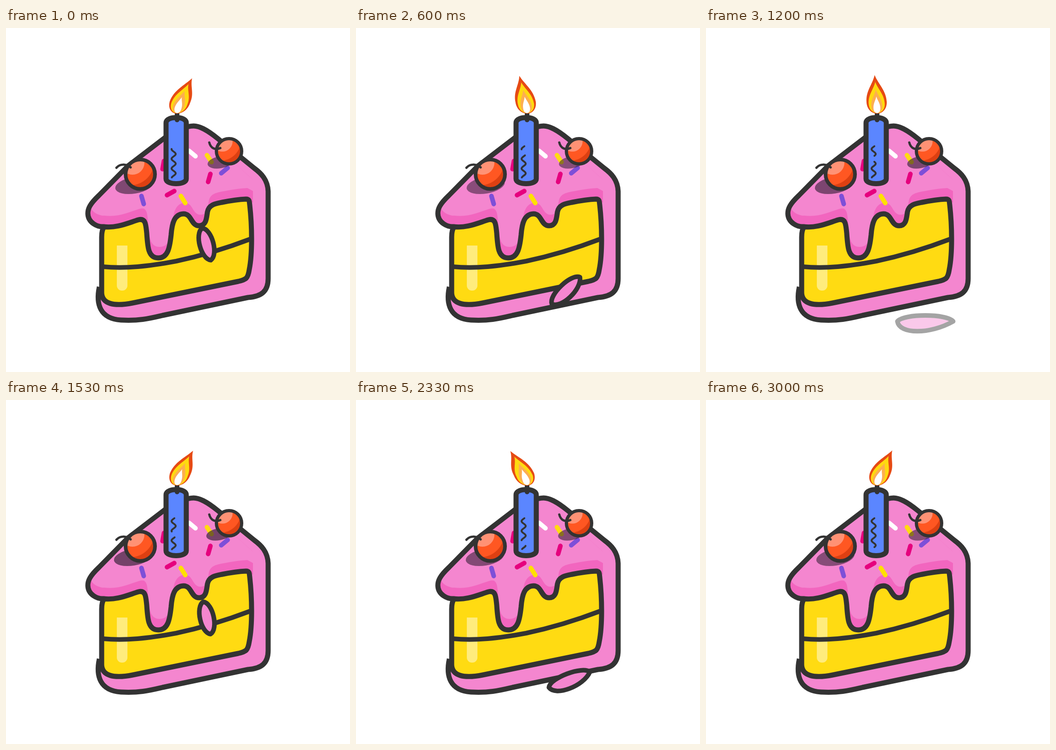
Recreate the animation shown at these times as an HTML page with a canvas. Size 748 by 748 pixels, loop 3.07 s.

```html
<!DOCTYPE html>
<html lang="en">
<head>
<meta charset="utf-8">
<title>Birthday cake</title>
<style>
html, body { margin: 0; width: 100%; height: 100%; overflow: hidden; background: #fff; }
canvas { display: block; width: 100vw; height: 100vh; }
</style>
</head>
<body>
<canvas id="stage" width="748" height="748"></canvas>
<script>
const ctx = document.getElementById('stage').getContext('2d');
const LOOP = 3070, FRAMES = 46, STEP = 1000 / 15, DRIP_TIME = 1510;
const TAU = Math.PI * 2, RAD = Math.PI / 180;
const INK = '#333', PINK = '#f486cf', DEEP = '#f266bf', YELLOW = '#ffdb12';
const MAGENTA = '#e6007e', PURPLE = '#7d4fd8';

// shared curves of the slice
const tip = 'C182 383 178 393 178 403 C178 424 200 433 212 432 ';
const edge = 'C240 436 265 424 288 417 C304 413 304 428 306 446 C308 476 309 500 331 500 ' +
  'C352 500 356 478 359 450 C361 424 366 405 386 404 C404 404 402 430 420 430 ' +
  'C436 430 436 412 438 400 C441 384 455 382 470 379 Q500 373 522 372 ';
const side = 'M203 563 C195 600 204 632 250 635 C290 637 310 632 340 625 L526 586 ' +
  'C556 584 570 572 570 545 L570 355 C569 330 555 316 540 305 L460 240 C435 220 420 213 408 213 ' +
  'C395 213 370 221 350 235 L265 300 L202 364 ' + tip;
const outline = new Path2D(side);
const body = new Path2D(side + 'L208 455 L208 563 Z');
const icing = new Path2D('M202 364 ' + tip + edge + 'L537 380 L537 330 L408 213 L350 235 L265 300 Z');
const sponge = new Path2D('M212 432 ' + edge + 'C530 372 529 378 530 385 C535 430 536 490 529 525 ' +
  'C526 545 522 547 505 551 L275 598 C235 606 208 600 208 575 L208 455 C208 445 209 437 214 432 Z');
const layer = new Path2D('M210 519 C260 524 310 518 370 507 Q450 490 531 459');
const candle = new Path2D('M348 206 C348 191 392 191 392 206 L392 328 C392 342 348 342 348 328 Z');
const wick = new Path2D('M372 186 L372 200');

// colour, centre, angle
const sprinkles = [
  ['#fff', 405, 273, 40], [YELLOW, 442, 284, 56], [MAGENTA, 442, 326, -74], [MAGENTA, 358, 359, -29],
  [MAGENTA, 342, 298, -80], [PURPLE, 297, 374, 74], [PURPLE, 475, 310, -40], ['#ffe000', 385, 373, 58]
];

function fill(path, color) {
  ctx.fillStyle = color;
  ctx.fill(path);
}

function stroke(path, width, color = INK, cap = 'round') {
  ctx.lineWidth = width;
  ctx.strokeStyle = color;
  ctx.lineCap = cap;
  ctx.lineJoin = 'round';
  ctx.stroke(path);
}

function oval(x, y, rx, ry, color, turn = 0) {
  const path = new Path2D();
  path.ellipse(x, y, rx, ry, turn, 0, TAU);
  fill(path, color);
  return path;
}

function drawCake() {
  fill(body, PINK);
  fill(icing, DEEP);
  ctx.save();
  ctx.clip(icing);
  ctx.translate(3, -24);
  fill(icing, PINK);
  ctx.restore();
  fill(sponge, YELLOW);
  ctx.fillStyle = 'rgba(255,255,255,.45)';
  ctx.beginPath();
  ctx.roundRect(241, 473, 23, 98, [0, 0, 11, 11]);
  ctx.fill();
  stroke(layer, 10, INK, 'butt');
  stroke(sponge, 11);
  stroke(outline, 11, INK, 'butt');
  for (const [color, x, y, turn] of sprinkles) {
    const dx = 9 * Math.cos(turn * RAD), dy = 9 * Math.sin(turn * RAD);
    stroke(new Path2D(`M${x - dx} ${y - dy} L${x + dx} ${y + dy}`), 10, color);
  }
}

// a falling, turning drop that flattens and fades
function drawDrip(p) {
  const alpha = Math.max(0, Math.min(1, (1430 - p) / 520));
  if (!alpha) return;
  const s = (p / 1430) ** 2;
  const len = 36 + 35 * s, low = 20 + 12 * s, high = 20 - 4 * s, lag = .45 * len * s;
  const path = new Path2D();
  path.moveTo(-len, 0);
  path.bezierCurveTo(-.8 * len, high, .8 * len, high, len, 0);
  path.bezierCurveTo(.8 * len + lag * .4, -low, -.8 * len + lag * 2, -low, -len, 0);
  path.closePath();
  ctx.save();
  ctx.translate(436 + .034 * p, Math.min(638, 470 + .168 * p));
  ctx.rotate(Math.min(180, 75 + .1025 * p) * RAD);
  fill(path, `rgba(244,134,207,${alpha})`);
  if (alpha < 1) stroke(path, 10, '#fff');
  stroke(path, 10, `rgba(51,51,51,${alpha})`);
  ctx.restore();
}

function cherry(x, y, r, line) {
  const k = r / 32, skin = oval(x, y, r, r, '#dd4012');
  ctx.save();
  ctx.clip(skin);
  oval(x - 22 * k, y - 28 * k, 52 * k, 52 * k, '#ff5722');
  oval(x - 17 * k, y - 25 * k, 26 * k, 26 * k, '#ff9275');
  ctx.restore();
  stroke(skin, line);
}

function drawCherries(t) {
  const dx = 3 * Math.sin(TAU * t / 2200);
  const shadow = `rgba(40,25,45,${.57 - dx * .018})`;
  oval(279 + dx, 342, 42, 18, shadow, -.17);
  oval(466 + dx, 292, 28, 13, shadow, -.17);
  cherry(292, 318, 32, 8);
  cherry(485, 268, 27.5, 7);
  stroke(new Path2D('M240 304 C248 295 260 295 271 303'), 5);
  stroke(new Path2D('M442 249 C445 262 456 266 466 261'), 5);
}

function squiggle(from, to) {
  if (to - from < 1) return;
  const path = new Path2D();
  for (let y = from; y <= to; y++)
    path.lineTo(364.5 + 4.5 * Math.cos((y - 274) * TAU / 21), y);
  stroke(path, 4);
}

function drawCandle(t) {
  const gap = 257 + t * .0232;
  fill(candle, '#5b86ff');
  stroke(candle, 11);
  stroke(wick, 10);
  squiggle(257, Math.min(325, gap - 6));
  squiggle(Math.max(257, gap + 6), 325);
}

function drawFlame(t) {
  const lean = Math.cos((.2405 * t - 27) * RAD);
  const bend = (x, y) => {
    const h = Math.max(0, -y / 83);
    return [372 + x + lean * 36 * h ** 1.4, 186 + y + lean * h * (9 * lean * h + .35 * x)];
  };
  const tongue = (top, half, base, color) => {
    const at = (x, h) => bend(x * half, -base - h * (top - base));
    ctx.fillStyle = color;
    ctx.beginPath();
    ctx.moveTo(...at(0, 1));
    ctx.bezierCurveTo(...at(-.3, .75), ...at(-1, .6), ...at(-1, .3));
    ctx.bezierCurveTo(...at(-1, .12), ...at(-.55, 0), ...at(0, 0));
    ctx.bezierCurveTo(...at(.55, 0), ...at(1, .12), ...at(1, .3));
    ctx.bezierCurveTo(...at(1, .6), ...at(.3, .75), ...at(0, 1));
    ctx.fill();
  };
  tongue(84, 22, 0, '#e64a14');
  tongue(69, 17.5, 1, '#ffda10');
  tongue(52, 12, 1, '#fdae50');
  tongue(37, 7.5, 1, '#fff');
}

function draw(t) {
  ctx.fillStyle = '#fff';
  ctx.fillRect(0, 0, 748, 748);
  drawCake();
  drawDrip(t % DRIP_TIME);
  drawCherries(t);
  drawCandle(t);
  drawFlame(t);
}

const start = performance.now();
function tick() {
  const t = (performance.now() - start) % LOOP;
  const frame = Math.min(FRAMES - 1, Math.floor((t + 4) / STEP));
  draw(frame * STEP);
  requestAnimationFrame(tick);
}
tick();
</script>
</body>
</html>
```
